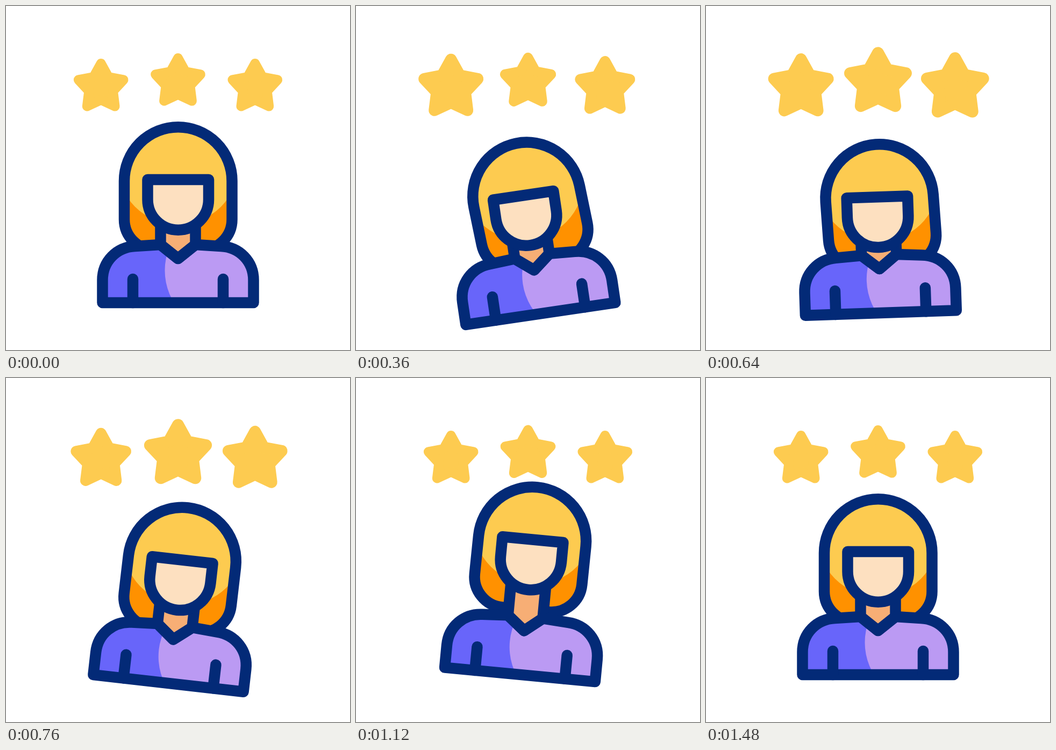
Animation of 640x640 px, one loop 1.72 s. Source, as an HTML page with a canvas:

```html
<!DOCTYPE html>
<html lang="en">
<head>
<meta charset="utf-8">
<title>Three stars</title>
<style>
  html, body { margin: 0; height: 100%; overflow: hidden; background: #fff; }
  canvas { display: block; width: 100vmin; height: 100vmin; margin: auto; }
</style>
</head>
<body>
<canvas id="stage" width="640" height="640"></canvas>
<script>
const ctx = document.getElementById('stage').getContext('2d');
const LOOP = 1720, STEP = 40;
const NAVY = '#032a77', YELLOW = '#fdcb50', ORANGE = '#ff9100', SKIN = '#fde0c0',
      NECK = '#f7ae75', VIOLET = '#6865fa', LILAC = '#bb9af3';
const LINE = 20.5, CENTER = 320, BODY_Y = 392, CROWN_Y = 220;

// Smooth step from 0 to 1 between two times in ms
function ramp(t, from, to) {
  const u = Math.min(1, Math.max(0, (t - from) / (to - from)));
  return (1 - Math.cos(Math.PI * u)) / 2;
}

// The body leans left, then right, while it sinks and rises again
const tilt = t => 8.4 * (2 * ramp(t, 495, 835) - ramp(t, 40, 365) - ramp(t, 1010, 1280));
const drop = t => 24 * ramp(t, 40, 430) - 7 * ramp(t, 440, 760) - 17 * ramp(t, 740, 1170);
// The head follows late along the body axis, and the hair swings from the crown
const nod = t => 15.3 * ramp(t, 190, 560) - 44 * ramp(t, 580, 1000) + 28.7 * ramp(t, 985, 1460);
const swing = t => 5.3 * ramp(t, 500, 880) - 3.9 * ramp(t, 60, 460) - 1.4 * ramp(t, 960, 1220);
const pulse = t => 1 + 0.25 * (ramp(t, 70, 500) - ramp(t, 500, 980));

const hair = new Path2D('M277 454 A57 57 0 0 1 220 397 V325.5 A100.25 100.25 0 0 1 420.5 325.5 V397 A57 57 0 0 1 363.5 454 Z');
const face = new Path2D('M263.5 323 H377 V360 A56.75 56.75 0 0 1 263.5 360 Z');
const neck = new Path2D('M287.5 380 V444 L320 470 L352.5 444 V380');
const torso = new Path2D('M179.5 552 V510 C179.5 475 206 448.5 240 447 L287.5 444 L320 470 L352.5 444 L400 447 C434 448.5 460.5 475 460.5 510 V552 Z');
const arms = new Path2D('M236 508 V552 M404 508 V552');

function fill(path, color) {
  ctx.fillStyle = color;
  ctx.fill(path);
}

function outline(path) {
  ctx.strokeStyle = NAVY;
  ctx.lineWidth = LINE;
  ctx.stroke(path);
}

// Fills a shape and tints the part of it inside a circle
function twoTone(path, base, tint, x, y, r) {
  fill(path, base);
  ctx.save();
  ctx.clip(path);
  const disc = new Path2D();
  disc.arc(x, y, r, 0, 2 * Math.PI);
  fill(disc, tint);
  ctx.restore();
}

// Paints with a turn about a point on the centre line and a shift downwards
function posed(pivotY, degrees, shift, paint) {
  ctx.save();
  ctx.translate(CENTER, pivotY + shift);
  ctx.rotate(degrees * Math.PI / 180);
  ctx.translate(-CENTER, -pivotY);
  paint();
  ctx.restore();
}

function drawStar(x, y, scale) {
  ctx.save();
  ctx.translate(x, y);
  ctx.scale(scale, scale);
  ctx.beginPath();
  for (let i = 0; i < 10; i++) {
    const r = i % 2 ? 23.5 : 44, a = i * Math.PI / 5;
    ctx.lineTo(r * Math.sin(a), 4 - r * Math.cos(a));
  }
  ctx.closePath();
  ctx.fillStyle = ctx.strokeStyle = YELLOW;
  ctx.lineWidth = 18;
  ctx.fill();
  ctx.stroke();
  ctx.restore();
}

// Left, right and middle star swell one after another
function drawStars(t) {
  [-1, 1, 0].forEach((side, order) => {
    drawStar(CENTER + 143.3 * side, 137 + 10 * Math.abs(side), pulse(t - 100 * order));
  });
}

function drawHair() {
  twoTone(hair, ORANGE, YELLOW, CENTER, 293, 113.4);
  outline(hair);
}

function drawBody() {
  fill(neck, NECK);
  twoTone(torso, VIOLET, LILAC, 409.5, 492, 114);
  [neck, torso, arms].forEach(outline);
}

function drawFace() {
  fill(face, SKIN);
  outline(face);
}

function drawPerson(t) {
  posed(BODY_Y, tilt(t), drop(t), () => {
    posed(CROWN_Y, swing(t), nod(t), drawHair);
    drawBody();
    posed(CROWN_Y, 0, nod(t), drawFace);
  });
}

function draw(now) {
  const t = Math.floor(now % LOOP / STEP) * STEP;
  ctx.fillStyle = '#fff';
  ctx.fillRect(0, 0, 640, 640);
  ctx.lineJoin = ctx.lineCap = 'round';
  drawStars(t);
  drawPerson(t);
}

const start = performance.now();
function tick() {
  draw(performance.now() - start);
  requestAnimationFrame(tick);
}
tick();
</script>
</body>
</html>
```
